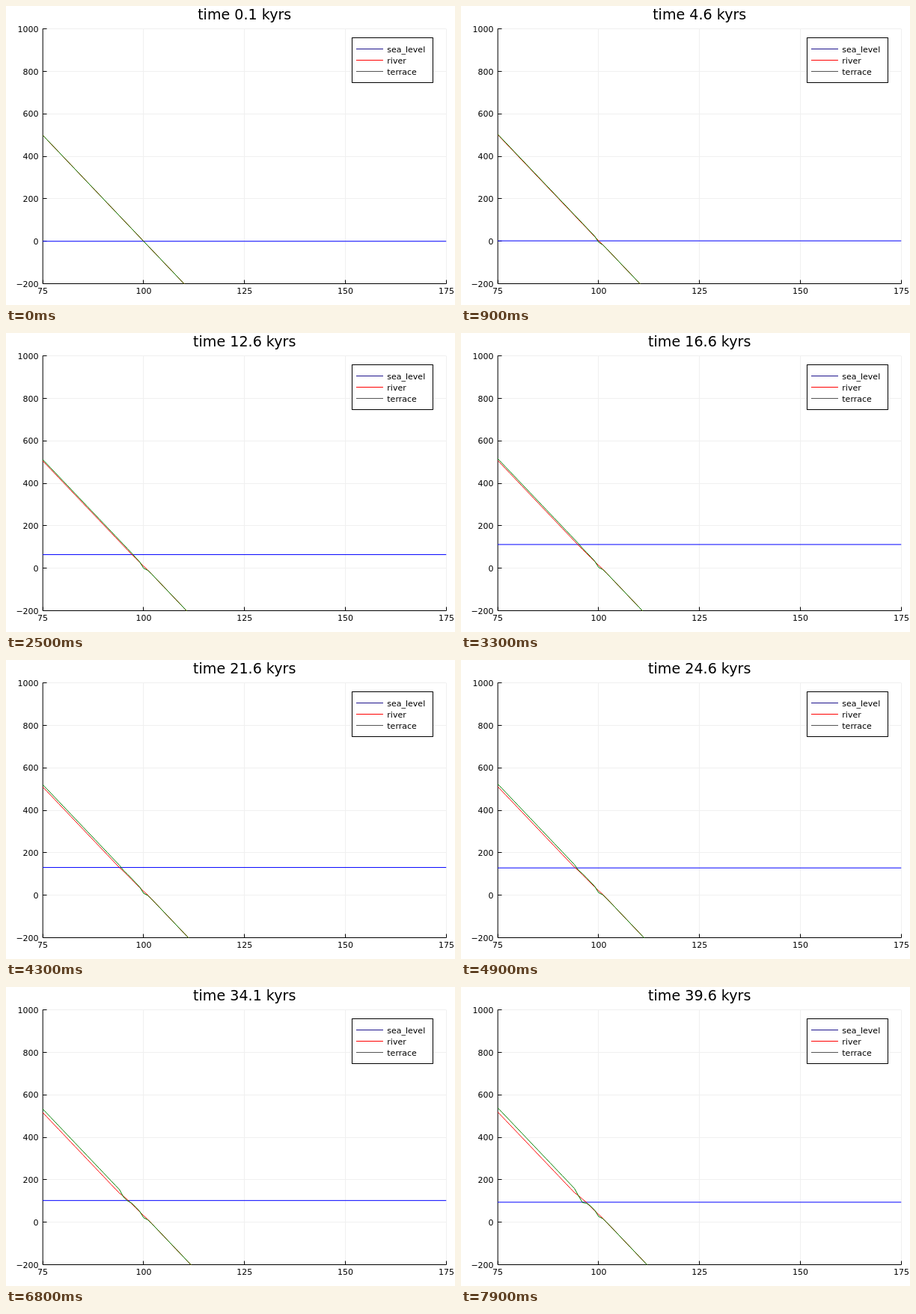
An HTML page that plays this animation: 600 px wide and 400 px high, repeating every 8 s.

```html
<!DOCTYPE html>
<html lang="en">
<head>
<meta charset="utf-8">
<title>Terrace evolution</title>
<style>
  html, body { margin: 0; width: 100%; height: 100%; overflow: hidden; background: #fff; }
  svg { display: block; width: 600px; height: 400px; }
  text { font: 11px "DejaVu Sans", sans-serif; fill: #000; }
  #title { font-size: 19.1px; }
  .end { text-anchor: end; }
  .mid { text-anchor: middle; }
  path, rect { fill: none; stroke-width: 1; }
</style>
</head>
<body>
<svg viewBox="0 0 600 400">
  <defs><clipPath id="plot"><rect x="49" y="31" width="539.5" height="341"/></clipPath></defs>
  <g id="axes"></g>
  <g clip-path="url(#plot)">
    <path id="sea" stroke="#00f"/>
    <path id="river" stroke="#f00"/>
    <path id="terrace" stroke="#008000"/>
  </g>
  <g id="legend"><rect x="462.5" y="42.5" width="108" height="60" style="fill:#fff" stroke="#000"/></g>
  <text id="title" class="mid" x="318.7" y="18"></text>
</svg>
<script>
const STEP_MS = 100, STEPS = 80, KYR_PER_STEP = 0.5, START = 0.1;
const UPLIFT = 1, RIVER_RATE = 0.5, WAVE_RATE = 3, WAVE_DEPTH = 8;
const SLOPE = 20, SUBSTEPS = 20;

// Sea level in metres at chosen ages in kyr
const SEA = [[0, 0], [3, 1], [6, 3], [7, 6], [8, 12], [9.1, 21], [10, 32], [12, 57], [14, 82],
  [15, 97], [16.6, 112], [18, 119], [20, 128], [21.6, 131], [24, 130], [26, 126.5],
  [28.1, 120.5], [31, 110], [34.1, 102.5], [37, 98], [40, 94]];

const $ = id => document.getElementById(id);
const px = x => 49.1 + (x - 75) * 5.393;
const py = y => 314.75 - y * 0.2838;
const crisp = v => Math.floor(v) + 0.5;

function add(parent, name, attrs, label) {
  const node = document.createElementNS("http://www.w3.org/2000/svg", name);
  for (const key in attrs) node.setAttribute(key, attrs[key]);
  if (label !== undefined) node.textContent = label;
  $(parent).append(node);
}

function seaAt(t) {
  const i = Math.max(1, SEA.findIndex(p => p[0] >= t));
  const [t0, a] = SEA[i - 1], [t1, b] = SEA[i];
  return a + (b - a) * (t - t0) / (t1 - t0);
}

function simulate() {
  const distance = Array.from({ length: 101 }, (_, i) => 75 + i);
  const river = distance.map(x => SLOPE * (100 - x));
  const terrace = river.slice();
  const states = [];
  let t = 0;
  const advance = dt => {
    t += dt;
    const sea = seaAt(t);
    distance.forEach((_, i) => {
      river[i] += (UPLIFT - (river[i] > sea ? RIVER_RATE : 0)) * dt;
      const depth = sea - terrace[i];
      const cut = depth >= 0 ? WAVE_RATE * Math.exp(-depth / WAVE_DEPTH) : 0;
      terrace[i] += (UPLIFT - cut) * dt;
    });
  };
  advance(START);
  const line = ys => "M" + ys.map((y, i) => px(distance[i]).toFixed(2) + " " + py(y).toFixed(2)).join("L");
  for (let n = 0; n < STEPS; n++) {
    states.push({
      title: `time ${t.toFixed(1)} kyrs`,
      sea: `M49 ${py(seaAt(t)).toFixed(2)}H588.5`,
      river: line(river),
      terrace: line(terrace)
    });
    for (let s = 0; s < SUBSTEPS; s++) advance(KYR_PER_STEP / SUBSTEPS);
  }
  return states;
}

function drawAxes() {
  const xs = [75, 100, 125, 150, 175], ys = [-200, 0, 200, 400, 600, 800, 1000];
  for (const x of xs) add("axes", "path", { d: `M${crisp(px(x))} 31V371`, stroke: "#f0f0f0" });
  for (const y of ys) add("axes", "path", { d: `M49 ${crisp(py(y))}H588.5`, stroke: "#f0f0f0" });
  add("axes", "path", { d: "M49.2 30.5V371.5H588.5", stroke: "#000" });
  for (const x of xs) {
    add("axes", "path", { d: `M${crisp(px(x))} 371.5v-5`, stroke: "#000" });
    add("axes", "text", { class: "mid", x: px(x), y: 385 }, x);
  }
  for (const y of ys) {
    add("axes", "path", { d: `M49 ${crisp(py(y))}h5.5`, stroke: "#000" });
    add("axes", "text", { class: "end", x: 43.6, y: py(y) + 4 }, String(y).replace("-", "\u2212"));
  }
}

function drawLegend() {
  [["sea_level", "#1c128c"], ["river", "#f00"], ["terrace", "#555"]].forEach(([name, color], i) => {
    const y = 57.5 + 15 * i;
    add("legend", "path", { d: `M468 ${y}H504`, stroke: color });
    add("legend", "text", { x: 509.3, y: y + 4 }, name);
  });
}

drawAxes();
drawLegend();
const states = simulate();

function render(now) {
  const state = states[Math.floor(now / STEP_MS) % STEPS];
  $("title").textContent = state.title;
  for (const id of ["sea", "river", "terrace"]) $(id).setAttribute("d", state[id]);
}

let origin;
function tick(now) {
  origin ??= now;
  render(Math.max(0, now - origin));
  requestAnimationFrame(tick);
}
render(0);
requestAnimationFrame(tick);
</script>
</body>
</html>
```
